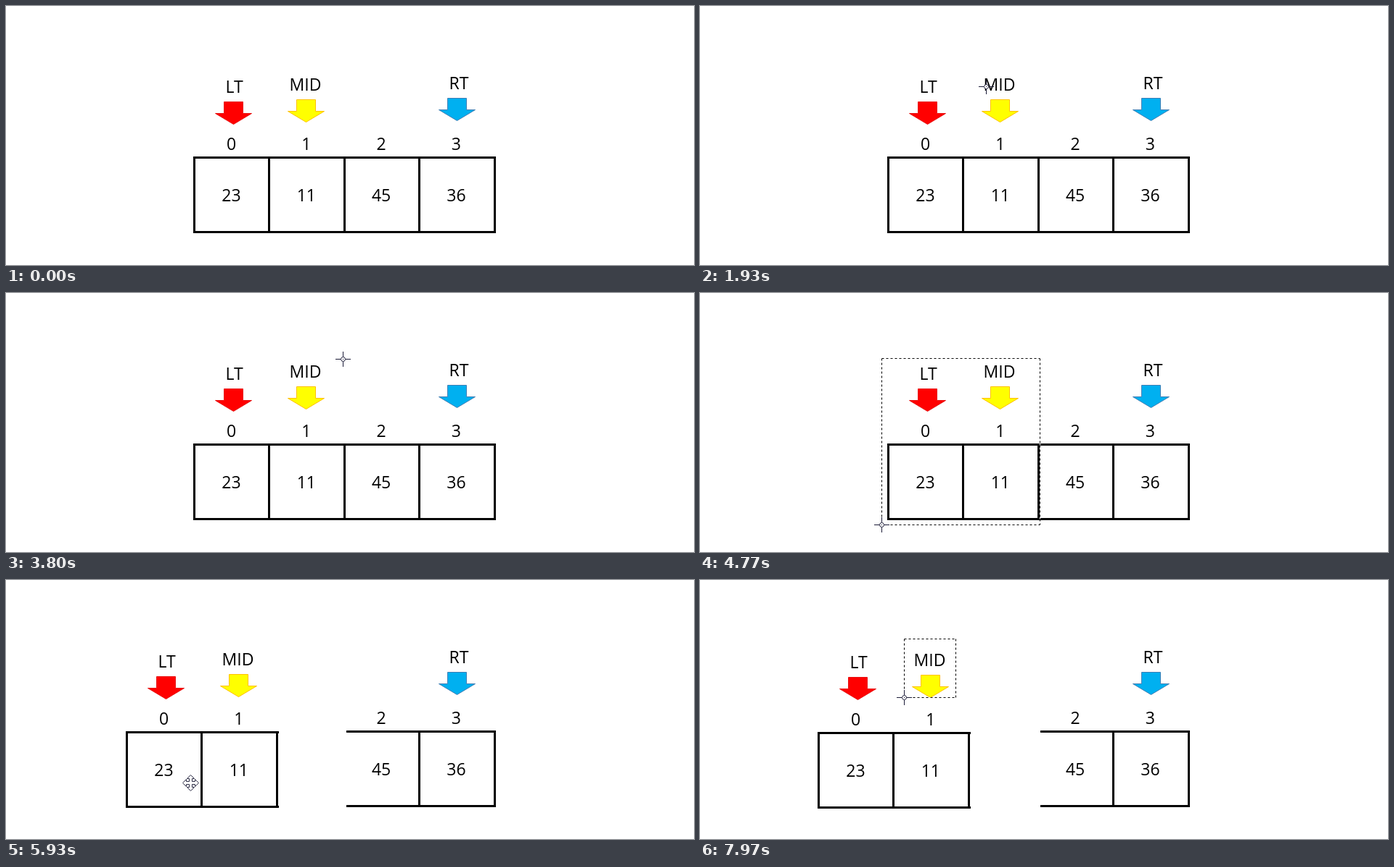
These frames come from a looping animation (948x358 px, 8000 ms). An HTML page with a canvas:

```html
<!DOCTYPE html>
<html lang="en">
<head>
<meta charset="utf-8">
<title>Splitting an array</title>
<style>
  html, body { margin: 0; width: 100%; height: 100%; overflow: hidden; background: #fff; }
  canvas { display: block; }
</style>
</head>
<body>
<canvas id="stage" width="948" height="358"></canvas>
<script>
const ctx = document.getElementById('stage').getContext('2d');
const WIDTH = 948, HEIGHT = 358, LOOP = 8000;
const CUT = 469, INK = '#1c1c38';
const DRAG_START = 5440, DRAG_END = 6670;

const clamp = u => Math.min(1, Math.max(0, u));
const smooth = u => u * u * (3 - 2 * u);
const easeOut = u => 1 - (1 - u) ** 2;

// The pointer first circles the array, drifting from its left to its right half
function circling(t) {
  const drift = smooth(clamp((t - 1500) / 690));
  const angle = 2 * Math.PI * ((t - 1930) / 715) - 2.4;
  return {
    x: 342 + 220 * drift + 134 * Math.cos(angle),
    y: 203 + 135 * Math.sin(angle)
  };
}

// Then it makes single moves: from, until, x, y, easing
const grab = { x: 347, y: 279 };
const moves = [
  [3430, 3800, 464, 91, easeOut],
  [3970, 4000, 468, 90, smooth],
  [4200, 4770, 250, 320, smooth],
  [4970, 5300, grab.x, grab.y, smooth],
  [DRAG_START, 6010, 252, 280, easeOut],
  [6430, 6470, 251, 281, smooth],
  [DRAG_END, 6930, 445, 144, smooth],
  [7070, 7300, 324, 95, smooth],
  [7300, 7430, 352, 81, smooth],
  [7570, 7970, 281, 162, smooth]
];

function pointerAt(t) {
  let { x, y } = circling(Math.min(t, 3370));
  for (const [from, until, toX, toY, ease] of moves) {
    const u = ease(clamp((t - from) / (until - from)));
    x += (toX - x) * u;
    y += (toY - y) * u;
  }
  return { x: Math.round(x), y: Math.round(y) };
}

function outline(points, fill, stroke) {
  ctx.beginPath();
  for (const [x, y] of points) ctx.lineTo(x, y);
  ctx.closePath();
  ctx.fillStyle = fill;
  ctx.strokeStyle = stroke;
  ctx.lineWidth = 1;
  ctx.fill();
  ctx.stroke();
}

function marker(text, textX, x, top, fill, stroke) {
  const half = [[13, 0], [13, 16], [25, 16], [0, 31]];
  const mirrored = half.map(([dx, dy]) => [-dx, dy]).reverse();
  outline([...half, ...mirrored].map(([dx, dy]) => [x + dx, top + dy]), fill, stroke);
  ctx.fillStyle = '#000';
  ctx.fillText(text, textX, top - 12.5);
}

function drawArray() {
  marker('LT', 314.5, 313.5, 132.5, '#ff0000', '#e81010');
  marker('MID', 412.5, 413.5, 129.5, '#ffff00', '#ffc000');
  marker('RT', 624, 621.5, 127.5, '#00b0f0', '#3f7fb5');

  [23, 11, 45, 36].forEach((value, i) => {
    const x = 310.5 + 103.3 * i;
    ctx.fillText(i, x, 199);
    ctx.fillText(value, x, 270);
  });

  for (let i = 0; i <= 4; i++) ctx.fillRect(258 + Math.floor(103.5 * i), 208, 3, 106);
  for (const y of [208, 311]) ctx.fillRect(258, y, 417, 3);
}

function drawPart(x, width, dx, dy) {
  ctx.save();
  ctx.translate(dx, dy);
  ctx.beginPath();
  ctx.rect(x, 0, width, HEIGHT);
  ctx.clip();
  drawArray();
  ctx.restore();
}

function dashed(x1, y1, x2, y2) {
  ctx.beginPath();
  ctx.moveTo(x1, y1);
  ctx.lineTo(x2, y2);
  ctx.strokeStyle = '#fff';
  ctx.stroke();
  ctx.strokeStyle = '#000';
  ctx.setLineDash([3, 3]);
  ctx.stroke();
  ctx.setLineDash([]);
}

function selection(right, top, left, bottom, handles) {
  const [x1, y1, x2, y2] = [left, top, right, bottom].map(v => v + .5);
  ctx.lineWidth = 1;
  for (const y of [y1, y2]) dashed(x1, y, x2, y);
  for (const x of [x1, x2]) dashed(x, y1, x, y2);
  if (!handles) return;
  for (let i = 0; i < 9; i++) {
    if (i === 4) continue;
    const x = x1 + (x2 - x1) / 2 * (i % 3), y = y1 + (y2 - y1) / 2 * Math.floor(i / 3);
    ctx.fillStyle = '#fff';
    ctx.fillRect(x - 2, y - 2, 4, 4);
    ctx.strokeRect(x - 2, y - 2, 4, 4);
  }
}

function crosshair({ x, y }) {
  ctx.fillStyle = INK;
  for (const d of [-10, 4]) {
    ctx.fillRect(x + d, y, 7, 1);
    ctx.fillRect(x, y + d, 1, 7);
  }
  ctx.beginPath();
  ctx.arc(x + .5, y + .5, 3, 0, 2 * Math.PI);
  ctx.fillStyle = '#fff';
  ctx.strokeStyle = INK;
  ctx.lineWidth = 1;
  ctx.fill();
  ctx.stroke();
  ctx.fillStyle = INK;
  ctx.fillRect(x, y, 1, 1);
}

function moveCursor({ x, y }) {
  const arm = [[2, -2], [6, -2], [6, -5], [11, 0], [6, 5], [6, 2], [2, 2]];
  const points = [];
  for (let turn = 0; turn < 4; turn++) {
    const c = Math.cos(turn * Math.PI / 2), s = Math.sin(turn * Math.PI / 2);
    for (const [px, py] of arm) points.push([x + .5 + px * c - py * s, y + .5 + px * s + py * c]);
  }
  outline(points, '#fff', '#303048');
}

function draw(t) {
  const pointer = pointerAt(t);
  ctx.fillStyle = '#fff';
  ctx.fillRect(0, 0, WIDTH, HEIGHT);
  ctx.font = '23px "Open Sans", "Noto Sans", sans-serif';
  ctx.textAlign = 'center';

  let dx = 0, dy = 0;
  if (t < DRAG_START) {
    drawArray();
  } else {
    const held = pointerAt(Math.min(t, DRAG_END));
    dx = held.x - grab.x;
    dy = held.y - grab.y;
    drawPart(CUT, WIDTH - CUT, 0, 0);
    drawPart(0, CUT, dx, dy);
  }

  const dragging = t >= DRAG_START && t < DRAG_END;
  if (t >= 4200 && t < 4970) selection(468, 90, pointer.x, pointer.y);
  else if (t >= 4970 && t < 6930 && !dragging) selection(468 + dx, 90 + dy, 250 + dx, 320 + dy, true);
  else if (t >= 7570) selection(352, 81, pointer.x, pointer.y);

  if (t >= 5040 && t < 6830) moveCursor(pointer);
  else if (t >= 900) crosshair(pointer);
}

const start = performance.now();
function tick() {
  draw((performance.now() - start) % LOOP);
  requestAnimationFrame(tick);
}
tick();
</script>
</body>
</html>
```
